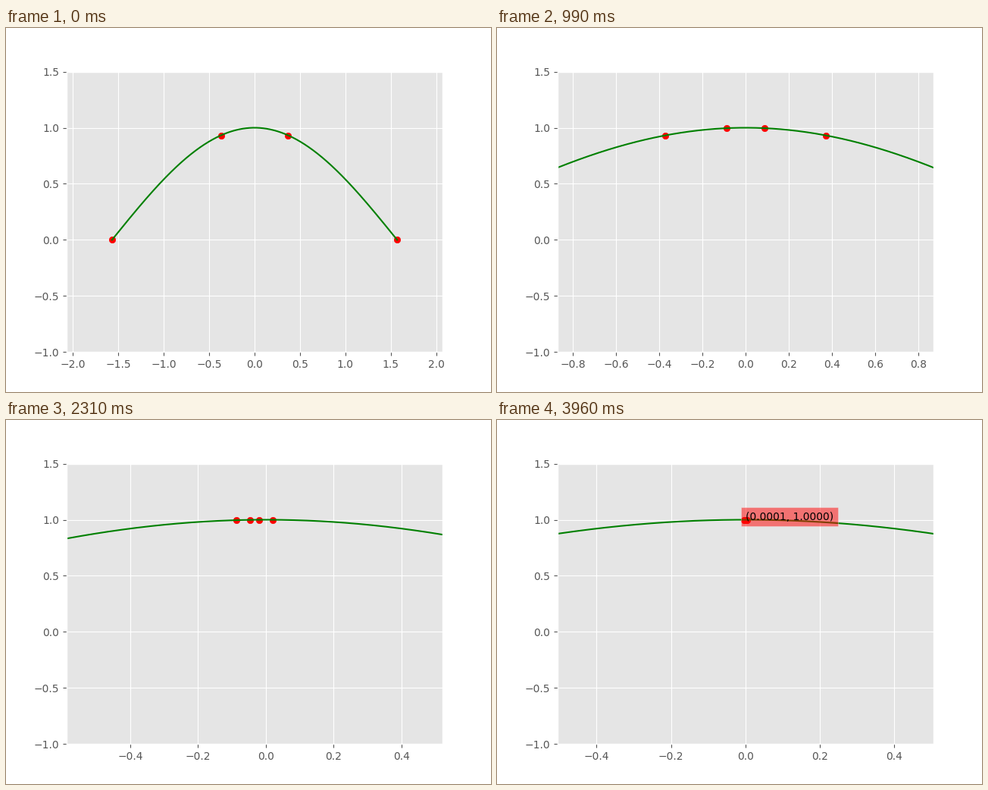
A matplotlib script for the animation above (4.29 s loop, 640 px wide and 480 px high).

```python
import numpy as np
import matplotlib.pyplot as plt
from matplotlib.animation import FuncAnimation

RATIO = 0.618
TOLERANCE = 0.01
MARGIN = 0.5
INTERVAL = 330


def golden_section(f, a, b):
    """Return the bracket points (a, c, d, b) of every step of a maximum search."""
    c = a + (1 - RATIO) * (b - a)
    d = a + RATIO * (b - a)
    steps = [(a, c, d, b)]
    while b - a > TOLERANCE:
        # The first two probes mirror each other, so ties within rounding go right.
        if f(c) - f(d) > 1e-12:
            b, d = d, c
            c = a + (1 - RATIO) * (b - a)
        else:
            a, c = c, d
            d = a + RATIO * (b - a)
        steps.append((a, c, d, b))
    return steps


plt.style.use("ggplot")
fig, ax = plt.subplots(figsize=(6.4, 4.8), dpi=100)

steps = golden_section(np.cos, -np.pi / 2, np.pi / 2)
curve_x = np.linspace(-np.pi / 2, np.pi / 2, 1000)
curve_y = np.cos(curve_x)


def draw(i):
    ax.clear()
    points = np.array(steps[i])
    a, b = points[0], points[-1]
    ax.plot(curve_x, curve_y, color="g")
    ax.scatter(points, np.cos(points), color="r")
    ax.set_xlim(a - MARGIN, b + MARGIN)
    ax.set_ylim(-1, 1.5)
    if i == len(steps) - 1:
        x = (a + b) / 2
        y = np.cos(x)
        ax.text(x, y, f"({x:.4f}, {y:.4f})",
                bbox=dict(facecolor="red", alpha=0.5))
    return ax.get_children()


anim = FuncAnimation(fig, draw, frames=len(steps), interval=INTERVAL,
                     init_func=lambda: [], repeat=True, repeat_delay=0)
plt.show()
```
